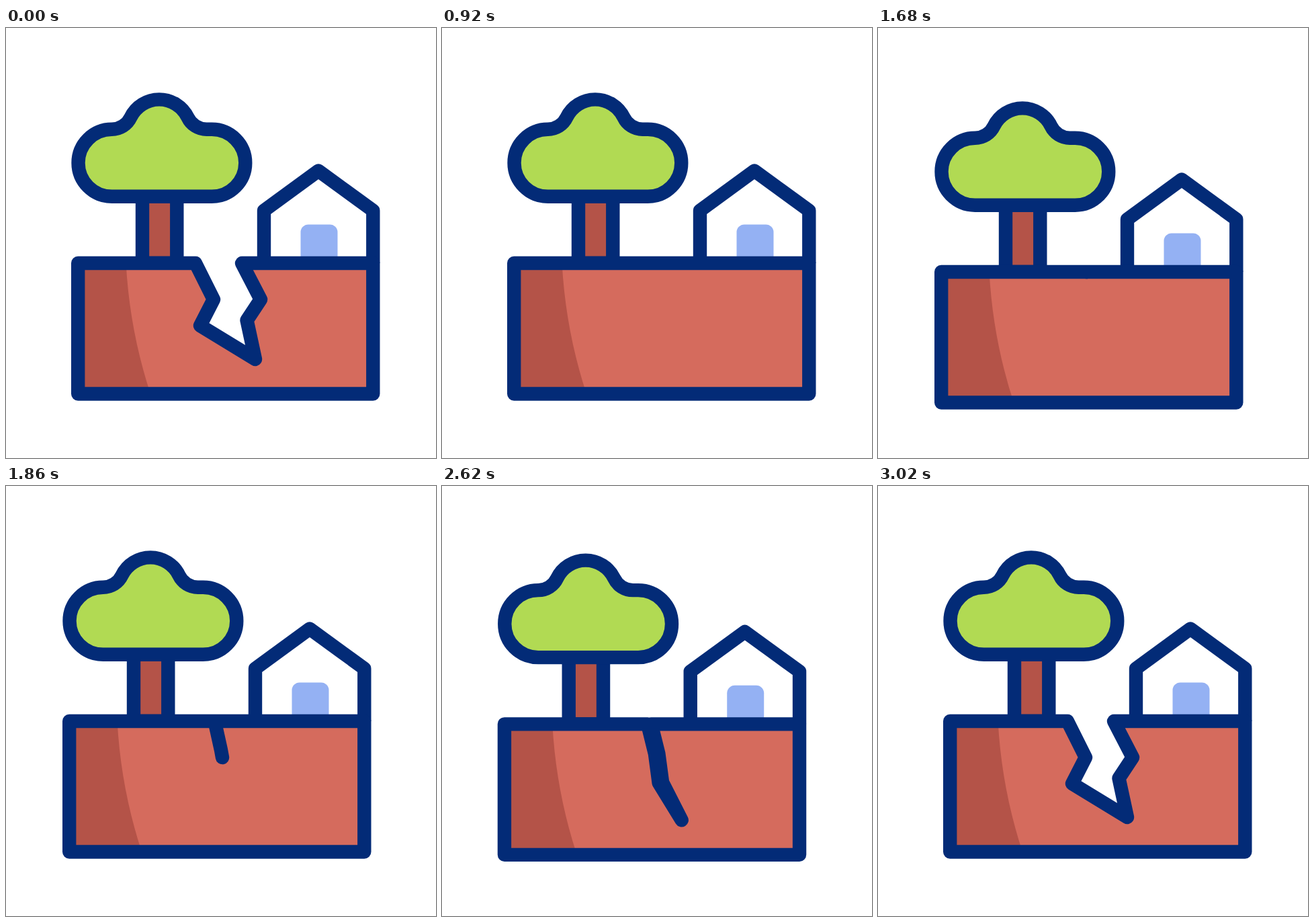
Animation of 640 by 640 pixels, one loop 3.22 s. Source, as an HTML page:

```html
<!DOCTYPE html>
<html lang="en">
<head>
<meta charset="utf-8">
<title>Earthquake</title>
<style>
  html, body { margin: 0; width: 100%; height: 100%; overflow: hidden; background: #fff; }
  svg { display: block; width: 100%; height: 100%; }
  .line { stroke: #032b77; stroke-width: 20.4; stroke-linejoin: round; }
</style>
</head>
<body>
<svg viewBox="0 0 640 640">
  <g id="scene">
    <path class="line" fill="#b45348" d="M203 250V350H254.3V250"/>
    <path class="line" fill="#b1da53" d="M157.5 250.8a50 50 0 0 1 0 -100A31 31 0 0 0 185.5 133
      A47.2 47.2 0 0 1 270.5 133A31 31 0 0 0 298.5 150.8H306.3a50 50 0 0 1 0 100Z"/>
    <path class="line" fill="#fff" d="M384 350V271.7L465 212.6L546.3 271.7V350"/>
    <path fill="#94b1f3" d="M438.5 345V304a11.5 11.5 0 0 1 11.5 -11.5h32a11.5 11.5 0 0 1 11.5 11.5V345Z"/>
    <path id="soil" fill="#d56b5d"/>
    <path fill="#b45348" d="M107.2 350H178.6Q184 450 215 544.5H107.2Z"/>
    <path id="edge" class="line" fill="none"/>
  </g>
</svg>
<script>
const LOOP = 3220, STEP = 20, LEG = 60;
const $ = id => document.getElementById(id);

// The crack as a thin line, and both sides of it when open
const crack = [[323.5, 350], [333, 393], [341, 437], [371, 493]];
const left = [[282, 350], [309, 404], [289, 443], [371, 493]];
const right = [[351, 350], [379, 404], [358.5, 435], [371, 493]];

// Corners of the shake; the third value bends the way to the next corner
const corners = [[0, 0, -.035], [-13, 0, 0], [0, 13, .11], [-13, 13, .11], [-13, 0, .035]];

const mix = (a, b, k) => [a[0] + (b[0] - a[0]) * k, a[1] + (b[1] - a[1]) * k];
const gap = (a, b) => Math.hypot(b[0] - a[0], b[1] - a[1]);

function ease(t, from, to) {
  const u = Math.min(1, Math.max(0, (t - from) / (to - from)));
  return u * u * (3 - 2 * u);
}

function shake(t) {
  if (t < 0 || t >= 600) return [0, 0];
  const i = Math.floor(t / LEG) % 5, u = t % LEG / LEG;
  const a = corners[i], b = corners[(i + 1) % 5];
  const bend = a[2] * 4 * u * (1 - u);
  const [x, y] = mix(a, b, u);
  return [x + (b[1] - a[1]) * bend, y - (b[0] - a[0]) * bend];
}

// Cuts the crack line to a share of its length, keeping the number of points
function cut(share) {
  const total = crack.slice(1).reduce((sum, p, i) => sum + gap(crack[i], p), 0);
  let rest = total * share, tip = crack[0];
  return crack.map((p, i) => {
    if (i) {
      const len = gap(crack[i - 1], p);
      tip = mix(crack[i - 1], p, Math.min(1, rest / len));
      if (rest <= 0) tip = mix(crack[i - 1], p, 0);
      if (rest < len) { rest = 0; return stop(i, tip); }
      rest -= len;
    }
    return stop(i, tip);
  });
}

// Once the tip is reached, later points stay on it
let end = null;
function stop(i, p) {
  if (!i) end = null;
  if (end) return end;
  const done = i && gap(p, crack[i]) > 1e-6;
  if (done) end = p;
  return p;
}

function draw(now) {
  const t = Math.floor(now % LOOP / STEP) * STEP;
  const grown = t < 1400 ? 1 - ease(t, 590, 925) : ease(t, 1667, 2140);
  const open = t < 1400 ? 1 - ease(t, 200, 590) : ease(t, 2537, 3020);
  const [dx, dy] = shake(t < 2300 ? t - 1500 : t - 2400);

  const line = cut(grown);
  const side = pts => line.map((p, i) => mix(p, pts[i], open));
  const points = [[107.2, 350], ...side(left), ...side(right).reverse(),
    [546.3, 350], [546.3, 544.5], [107.2, 544.5]];
  const d = "M" + points.map(p => p.map(v => v.toFixed(2))).join("L") + "Z";
  $("soil").setAttribute("d", d);
  $("edge").setAttribute("d", d);
  $("scene").setAttribute("transform", `translate(${dx} ${dy})`);
}

function tick() {
  draw(performance.now());
  requestAnimationFrame(tick);
}
tick();
</script>
</body>
</html>
```
